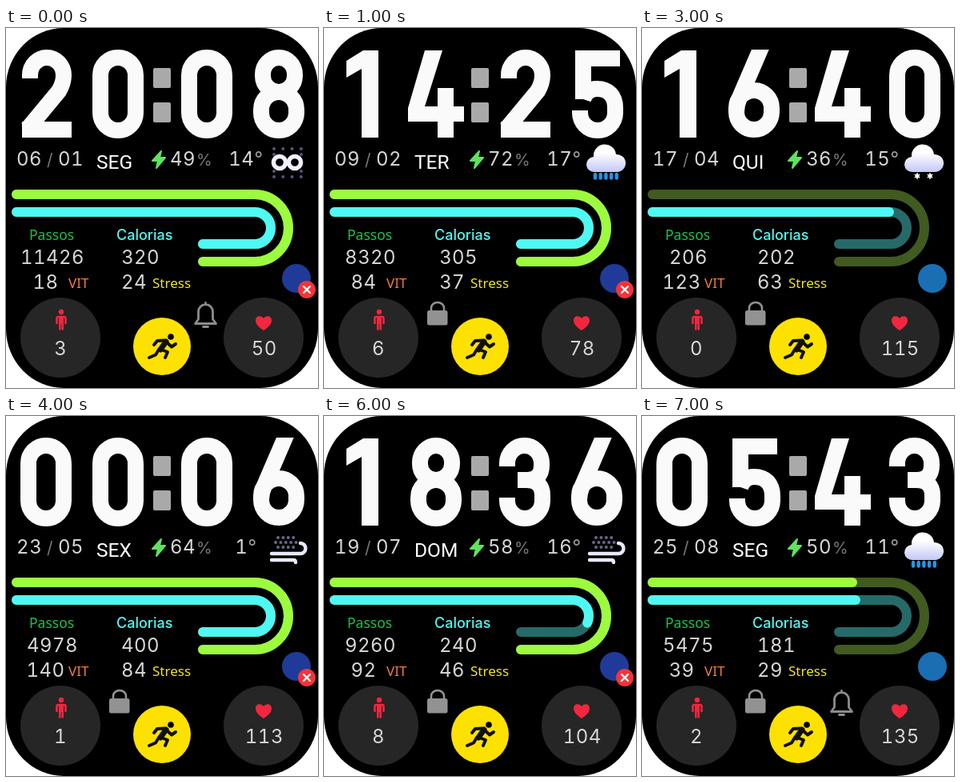
Animation of 390x450 px, one loop 8 s. Source, as an HTML page:

```html
<!DOCTYPE html>
<html lang="pt">
<head>
<meta charset="utf-8">
<title>Watch face</title>
<style>
  html, body { margin: 0; width: 100%; height: 100%; overflow: hidden; background: #fff; }
  svg { display: block; }
  .num { font: 400 24px Inter, sans-serif; font-variant-numeric: tabular-nums; letter-spacing: .4px; fill: #d6d6d6; }
  .mid { text-anchor: middle; }
  .dim { fill: #777; }
  .label { font: 400 17px "Noto Sans", sans-serif; }
  .line { fill: none; stroke-linecap: round; stroke-linejoin: round; }
  .bar { fill: none; stroke-width: 12; stroke-linecap: round; }
  .s { fill: none; stroke: #fafafa; stroke-width: 20; }
  .f { fill: #fafafa; }
</style>
</head>
<body>
<svg width="390" height="450" viewBox="0 0 390 450">
  <defs>
    <linearGradient id="sky" x1="0" y1="0" x2="0" y2="1">
      <stop offset=".3" stop-color="#fff"/><stop offset="1" stop-color="#c3c8f6"/>
    </linearGradient>
    <linearGradient id="gold" x1="0" y1="0" x2="0" y2="1">
      <stop offset="0" stop-color="#ffc22e"/><stop offset="1" stop-color="#ff9a0a"/>
    </linearGradient>

    <symbol id="d0" viewBox="-6 0 76 111"><path class="s" d="M10 32a22 22 0 0 1 44 0V79a22 22 0 0 1-44 0Z"/></symbol>
    <symbol id="d1" viewBox="-6 0 76 111"><path class="f" d="M50 1V110H29V24L10 35V14L31 1Z"/></symbol>
    <symbol id="d2" viewBox="-6 0 76 111"><path class="s" d="M12 36V32a21 22 0 0 1 42 0q0 10-6 20L9 99M2 100H64"/></symbol>
    <symbol id="d3" viewBox="-6 0 76 111"><path class="s" d="M10 36V32a21.5 22 0 0 1 43 0v3c0 12-7 18-18 18H23M34 53c13 0 20 7 20 19v7a22 22 0 0 1-44 0v-4"/></symbol>
    <symbol id="d4" viewBox="-6 0 76 111"><path class="f" d="M18 1H40L18 71H34V48H54V71H67V90H54V110H34V90H-3V73Z"/></symbol>
    <symbol id="d5" viewBox="-6 0 76 111"><path class="s" d="M61 11H15V62M15 62C18 53 24 49 32 49c15 0 23 9 23 24v6a22 22 0 0 1-44 0v-3"/></symbol>
    <symbol id="d6" viewBox="-6 0 76 111"><path class="s" d="M42-5L14 60Q10 69 10 78a22 22 0 0 0 44 0v-5a22 22 0 0 0-44 0v5"/></symbol>
    <symbol id="d8" viewBox="-6 0 76 111"><path class="s" d="M12 31a20 21 0 0 1 40 0v2a20 20 0 0 1-40 0ZM10 75a22 22 0 0 1 44 0v4a22 22 0 0 1-44 0Z"/></symbol>

    <path id="cloud" fill="url(#sky)" d="M338 180a9.500 9.500 0 0 1-1-19 14 14 0 0 1 28-3 11 11 0 0 1 2 22Z"/>

    <g id="haze">
      <path class="line" stroke="#55557c" stroke-width="4" stroke-dasharray="0 11.3" d="M335 151H370M335 186H370M335 158v1M369 158v1M335 179v1M369 179v1"/>
      <g fill="none" stroke="#f0f0ff" stroke-width="5.5">
        <circle cx="342" cy="168" r="7.6"/><circle cx="361" cy="168" r="7.6"/>
      </g>
    </g>
    <g id="storm" class="line" stroke-width="4.4">
      <path stroke="#eeeeff" d="M331 152H363M341 160H354M361 160H367M340 168H357M346 176H354M346 184H352"/>
      <path stroke="#70708f" d="M372 152h0M333 160h0M373 160h0M364 168h0M361 176h4"/>
    </g>
    <g id="snow">
      <use href="#cloud"/>
      <path class="line" stroke="#fff" stroke-width="1.8" d="M344 182v6M341.500 183.500l5 3M346.500 183.500l-5 3M360 182v6M357.500 183.500l5 3M362.500 183.500l-5 3"/>
    </g>
    <g id="wind" class="line">
      <path stroke="#666688" stroke-width="4" stroke-dasharray="0 6.4" d="M340 152H361M337 158H364M340 164H361"/>
      <path stroke="#e9e9ff" stroke-width="4.4" d="M332 172H368a6.500 6.500 0 0 0 0-13M332 180H359q3 0 3 3"/>
    </g>
    <g id="sun">
      <circle cx="352" cy="167" r="13" fill="url(#gold)"/>
      <circle class="line" cx="352" cy="167" r="19" stroke="#ffb020" stroke-width="4.6" stroke-dasharray="0 14.923"/>
    </g>
    <g id="rain">
      <use href="#cloud"/>
      <path class="line" stroke="#2396e6" stroke-width="4.4" d="M339 183v4.500M345.700 183v4.500M352.400 183v4.500M359.100 183v4.500M365.800 183v4.500"/>
    </g>
  </defs>

  <rect width="390" height="450" rx="72" ry="74"/>

  <g id="clock"></g>
  <g fill="#a9a9a9">
    <rect x="184" y="50" width="22" height="25" rx="2"/>
    <rect x="184" y="93" width="22" height="25" rx="2"/>
  </g>

  <text id="day" class="num" x="13" y="172"></text>
  <text class="num dim" x="51" y="172" style="font-size:21px">/</text>
  <text id="month" class="num" x="65" y="172"></text>
  <text id="week" x="113" y="176" fill="#fff" style="font:400 24.5px Roboto,sans-serif"></text>
  <path class="line" stroke="#5fe35f" stroke-width="2" style="fill:#5fe35f" d="M194 154L183 166H190L188 175L199 162H192Z"/>
  <text class="num" x="205" y="172"><tspan id="power"></tspan><tspan class="dim" dx="1" style="font-size:20px">%</tspan></text>
  <text class="num mid" x="300" y="172"><tspan id="temp"></tspan><tspan fill="#999">°</tspan></text>
  <use id="sky-icon"/>

  <path class="bar" stroke="#405a20" d="M13 208H311a42 42 0 0 1 0 84H246"/>
  <path class="bar" stroke="#276969" d="M13 230H311a20 20 0 0 1 0 40H246"/>
  <path id="green" class="bar" stroke="#9cfb3e" d="M13 208H311a42 42 0 0 1 0 84H246"/>
  <path id="cyan" class="bar" stroke="#50f8f2" d="M13 230H311a20 20 0 0 1 0 40H246"/>

  <text class="label" x="29" y="265" fill="#18c24c" style="font-size:17.5px">Passos</text>
  <text x="138" y="265" fill="#50f8f2" style="font:500 18px Inter,sans-serif">Calorias</text>
  <text class="label" x="78" y="325" fill="#f67c34">VIT</text>
  <text class="label" x="183" y="325" fill="#f4e80c">Stress</text>
  <text id="steps" class="num mid" x="58" y="295"></text>
  <text id="cal" class="num mid" x="168" y="295"></text>
  <text id="vit" class="num mid" x="49.500" y="326"></text>
  <text id="stress" class="num mid" x="160" y="326"></text>

  <circle id="link" cx="363" cy="313" r="18"/>
  <g id="cut">
    <circle cx="376" cy="327" r="11" fill="#f5333a"/>
    <path class="line" stroke="#fff" stroke-width="2.4" d="M372 323l8 8M380 323l-8 8"/>
  </g>

  <circle cx="68" cy="387" r="50" fill="#262626"/>
  <circle cx="322" cy="387" r="50" fill="#262626"/>
  <g fill="#f2263f">
    <circle cx="69" cy="355" r="3.2"/>
    <path d="M66 360h6v10h-6Z"/>
    <path class="line" stroke="#f2263f" stroke-width="2.600" d="M63.500 369V363q0-2 2-2h7q2 0 2 2V369M67.300 369V376.500M70.700 369V376.500"/>
    <path d="M322 378C316.500 374.500 312 370.500 312 365.500c0-6 7-7 10-2.500 3-4.500 10-3.500 10 2.500 0 5-4.500 9-10 12.500Z"/>
  </g>
  <text id="stand" class="num mid" x="68" y="409"></text>
  <text id="pulse" class="num mid" x="322.800" y="409"></text>

  <circle cx="195" cy="398" r="36" fill="#fde100"/>
  <circle cx="206" cy="386" r="3.800"/>
  <g class="line" stroke="#111">
    <path stroke-width="7" d="M200 392L193 402"/>
    <path stroke-width="4" d="M198 390.500L189 391L185 396M201 393L207 398.500L212 395M194 402L202 405L199 412M191 402L187 408.500L179 412"/>
  </g>

  <g id="lock">
    <rect x="129" y="353" width="25.500" height="18.500" rx="2.500" fill="#929292"/>
    <path class="line" stroke="#929292" stroke-width="2.600" d="M134 354v-4a8 7 0 0 1 16 0v4"/>
  </g>
  <path id="bell" class="line" stroke="#8c8c8c" stroke-width="2.800" d="M236.500 369.500L240.500 364V354.500a9 9 0 0 1 18 0V364L262.500 369.500ZM249.500 345v-1.500M246.500 373.500h6"/>
</svg>

<script>
const $ = id => document.getElementById(id);
const DIGIT_X = [18, 108, 219, 309];

// time, date, weekday, battery, temperature, sky | steps, cal, vit, stress, stand, pulse | bar lengths | flags: x = link lost, l = lock, b = bell
const faces = [
  ['2008', '06/01', 'SEG', 49, 14, 'haze', 11426, 320, 18, 24, 3, 50, 500, 430, 'xb'],
  ['1425', '09/02', 'TER', 72, 17, 'rain', 8320, 305, 84, 37, 6, 78, 500, 430, 'xl'],
  ['0303', '12/03', 'QUA', 96, 20, 'storm', 6559, 61, 127, 63, 1, 93, 445, 85, 'l'],
  ['1640', '17/04', 'QUI', 36, 15, 'snow', 206, 202, 123, 63, 0, 115, 0, 296, 'l'],
  ['0006', '23/05', 'SEX', 64, 1, 'wind', 4978, 400, 140, 84, 1, 113, 500, 430, 'xl'],
  ['1023', '28/06', 'SAB', 85, 19, 'sun', 14843, 150, 106, 24, 11, 119, 500, 212, 'xl'],
  ['1836', '19/07', 'DOM', 58, 16, 'wind', 9260, 240, 92, 46, 8, 104, 500, 338, 'xl'],
  ['0543', '25/08', 'SEG', 50, 11, 'rain', 5475, 181, 39, 29, 2, 135, 250, 254, 'lb']
];

const show = (id, on) => $(id).style.display = on ? '' : 'none';

function bar(id, length) {
  show(id, length > 0);
  $(id).setAttribute('stroke-dasharray', length + ' 999');
}

function draw([time, date, week, power, temp, sky, steps, cal, vit, stress, stand, pulse, green, cyan, flags]) {
  const [day, month] = date.split('/');
  const texts = { day, month, week, power, temp, steps, cal, vit, stress, stand, pulse };
  for (const id in texts) $(id).textContent = texts[id];
  $('clock').innerHTML = [...time].map((d, i) =>
    `<use href="#d${d}" x="${DIGIT_X[i] - 6}" y="27" width="76" height="111"/>`).join('');
  $('sky-icon').setAttribute('href', '#' + sky);
  bar('green', green);
  bar('cyan', cyan);
  const lost = flags.includes('x');
  $('link').setAttribute('fill', lost ? '#1f3a98' : '#1a6eb4');
  show('cut', lost);
  show('lock', flags.includes('l'));
  show('bell', flags.includes('b'));
}

const start = performance.now();
let current = -1;
function tick() {
  const i = Math.floor((performance.now() - start) / 1000) % faces.length;
  if (i !== current) draw(faces[current = i]);
  requestAnimationFrame(tick);
}
tick();
</script>
</body>
</html>
```
